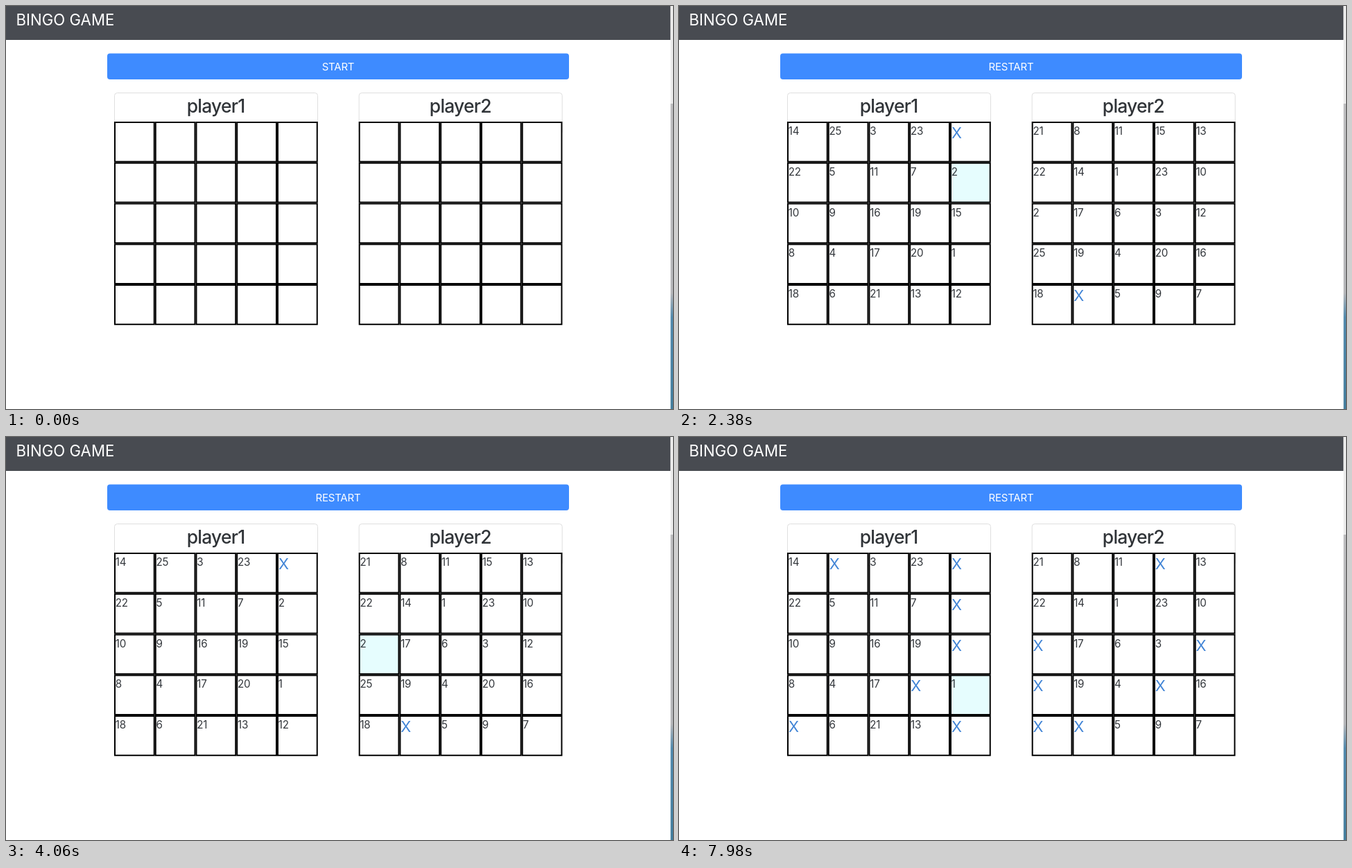
An HTML page that plays this animation: 962x582 px, repeating every 8000 ms.

```html
<!DOCTYPE html>
<html lang="ko">
<head>
<meta charset="utf-8">
<title>Bingo</title>
<style>
html, body { margin: 0; width: 100%; height: 100%; overflow: hidden; background: #fff; }
svg { display: block; font-family: Inter, Roboto, sans-serif; }
.num { font-size: 15.2px; letter-spacing: -.2px; fill: #33373c; }
.mark { font-size: 22px; fill: #4285d6; }
.name { font-size: 26.5px; font-weight: 500; letter-spacing: -.8px; fill: #303438; }
.label { font-size: 15px; letter-spacing: -.2px; fill: #fff; }
.mid { text-anchor: middle; }
#dialog { font-family: "Noto Sans CJK KR", "Noto Sans CJK", sans-serif; font-size: 10px; font-weight: 700; }
#sheet { filter: drop-shadow(0 2px 3px rgba(0, 0, 0, .35)); }
</style>
</head>
<body>
<svg id="stage" width="962" height="582" viewBox="0 0 962 582">
  <defs>
    <linearGradient id="desk" x1="0" y1="0" x2="0" y2="1">
      <stop offset="0" stop-color="#bcbcbe"/>
      <stop offset=".62" stop-color="#b4b5b8"/>
      <stop offset=".7" stop-color="#4f88ac"/>
      <stop offset="1" stop-color="#417c9c"/>
    </linearGradient>
  </defs>
  <rect width="962" height="582" fill="#fff"/>
  <rect width="958.5" height="49" fill="#484b51"/>
  <rect x="958.5" width="3.5" height="141" fill="#ececec"/>
  <rect x="958.5" y="141" width="3.5" height="441" fill="url(#desk)"/>
  <text x="14.6" y="28" font-size="22.2" fill="#fff">BINGO GAME</text>
  <rect id="ring" x="143" y="65.5" width="672" height="43.5" rx="6" fill="#9ac6fd"/>
  <rect id="button" x="146" y="68.5" width="666" height="37.5" rx="4"/>
  <text id="label" class="label mid" x="479" y="92.8"></text>
  <g id="boards"></g>
  <g id="dialog">
    <polygon id="sheet" fill="#fff"/>
    <g id="content">
      <text x="296" y="14" font-size="11" font-weight="500" fill="#3c3f44">잘못된 차례입니다</text>
      <rect x="543.5" y="34" width="56" height="28" rx="3.5" fill="#fff" stroke="#dcdee2"/>
      <text class="mid" x="571" y="51.5" fill="#3d74d0">취소</text>
      <rect id="ok" x="607" y="33.5" width="57" height="29" rx="3.5"/>
      <text class="mid" x="635" y="51.5" fill="#fff">확인</text>
    </g>
  </g>
</svg>
<script>
const LOOP = 8000, CELL = 58.75, TOP = 167, DEALT = 1260;
const players = [
  { x: 156, grid: [14,25,3,23,24, 22,5,11,7,2, 10,9,16,19,15, 8,4,17,20,1, 18,6,21,13,12] },
  { x: 508.7, grid: [21,8,11,15,13, 22,14,1,23,10, 2,17,6,3,12, 25,19,4,20,16, 18,24,5,9,7] }
];
// number -> time it is crossed out
const picks = { 24: 1820, 2: 4340, 15: 5180, 25: 5740, 12: 6300, 18: 7000, 20: 7490 };
// [time, player, number] under the pointer; no player means none
const hovers = [
  [0], [1680, 0, 24], [2240, 0, 2], [4060, 1, 2], [4620], [4830, 0, 15],
  [5390], [5600, 1, 25], [5950], [6090, 0, 12], [6790], [6860, 1, 18],
  [7210], [7350, 0, 20], [7770, 0, 1]
];

const $ = id => document.getElementById(id);
const ramp = (t, a, b) => Math.min(1, Math.max(0, (t - a) / (b - a)));
const mix = (a, b, k) => a + (b - a) * k;

function make(parent, tag, attrs, text = '') {
  const el = document.createElementNS('http://www.w3.org/2000/svg', tag);
  for (const key in attrs) el.setAttribute(key, attrs[key]);
  el.textContent = text;
  return parent.appendChild(el);
}

const cells = [];
players.forEach(({ x, grid }, player) => {
  const g = $('boards');
  make(g, 'rect', { x: x + .5, y: 125.5, width: 293, height: 60, rx: 4, fill: '#fff', stroke: '#dfdfdf' });
  make(g, 'text', { x: x + 146.6, y: 153.5, class: 'name mid' }, 'player' + (player + 1));
  grid.forEach((n, i) => {
    const cx = x + i % 5 * CELL, cy = TOP + Math.floor(i / 5) * CELL;
    const box = make(g, 'rect', {
      x: cx + 1, y: cy + 1, width: CELL - 2, height: CELL - 2, stroke: '#000', 'stroke-width': 2
    });
    const num = make(g, 'text', { x: cx + 1.7, y: cy + 19, class: 'num' }, n);
    const mark = make(g, 'text', { x: cx + 1.9, y: cy + 24.2, class: 'mark' }, 'X');
    cells.push({ player, n, box, num, mark });
  });
});

function drawButton(t) {
  const dark = ramp(t, 1120, 1260) - ramp(t, 1540, 1680);
  $('button').setAttribute('fill', `rgb(${mix(62, 58, dark)},${mix(139, 122, dark)},${mix(255, 226, dark)})`);
  $('ring').setAttribute('opacity', ramp(t, DEALT, 1400) - ramp(t, 1820, 1960));
  $('label').textContent = t < DEALT ? 'START' : 'RESTART';
}

function drawCells(t) {
  const [, player, n] = hovers.filter(h => h[0] <= t).pop();
  for (const c of cells) {
    const crossed = t >= picks[c.n];
    c.box.setAttribute('fill', c.player === player && c.n === n ? '#e6fdfe' : '#fff');
    c.num.setAttribute('visibility', t >= DEALT && !crossed ? 'visible' : 'hidden');
    c.mark.setAttribute('visibility', crossed ? 'visible' : 'hidden');
  }
}

function drawDialog(t) {
  const open = ramp(t, 2450, 2660) - ramp(t, 3640, 3870);
  const inset = mix(10, 0, open), bottom = mix(73.5, 77, open);
  $('dialog').setAttribute('opacity', open);
  $('sheet').setAttribute('points', `${280 + inset},-8 ${679 - inset},-8 679,${bottom} 280,${bottom}`);
  $('content').setAttribute('transform', `translate(0 ${mix(-2, 1, open)})`);
  $('ok').setAttribute('fill', t < 3500 ? '#4479e8' : '#94b3f5');
}

function frame() {
  const t = performance.now() % LOOP;
  drawButton(t);
  drawCells(t);
  drawDialog(t);
  requestAnimationFrame(frame);
}
frame();
</script>
</body>
</html>
```
